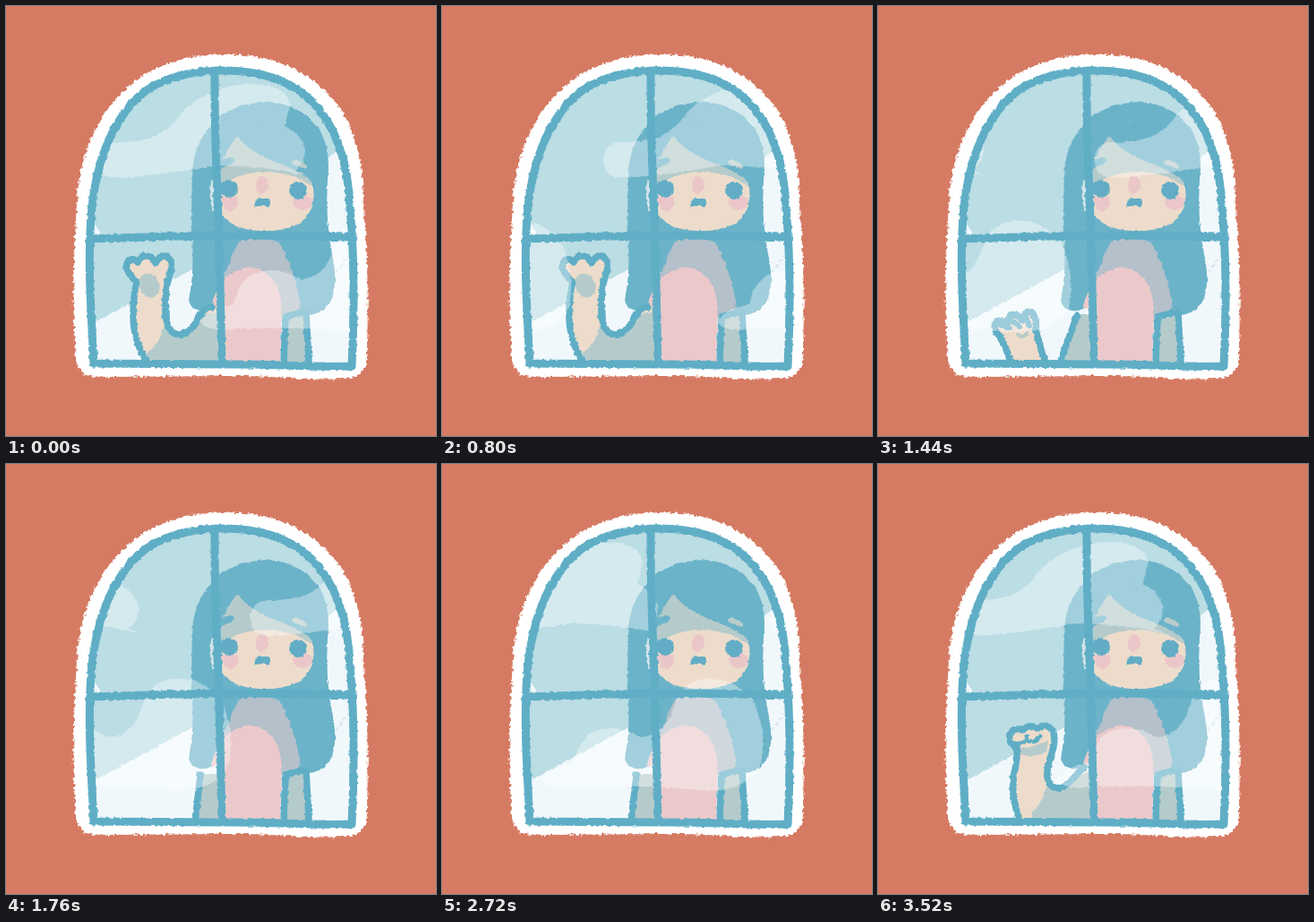
An HTML page for the animation above (3680 ms loop, 480x480 px).

```html
<!DOCTYPE html>
<html lang="en">
<head>
<meta charset="utf-8">
<title>Girl at the window</title>
<style>
  html, body { margin: 0; width: 100%; height: 100%; overflow: hidden; background: #d67b63; }
  svg { display: block; width: 100vw; height: 100vh; }
  .line { fill: none; stroke: #5faec6; stroke-width: 7.5; stroke-linecap: round; stroke-linejoin: round; }
  .bar { stroke-width: 9; }
  .hair { fill: #6bb3c9; }
  .ink { fill: #62adc5; }
  .skin { fill: #eddccb; }
  .shade { fill: #b5cbcb; }
  .rose { fill: #ebc6c8; }
  .cloud { fill: #fff; opacity: .38; }

  /* 23 drawings, 160 ms each */
  .cloud, .arm { animation: 3.68s -1ms infinite; }
  .cloud { animation-timing-function: steps(23); }
  .arm { animation-timing-function: step-end; }
  .high { animation-name: high; }
  .low { animation-name: low; }
  .up { animation-name: up; }
  .down { animation-name: down; }
  .curl { animation-name: curl; }
  .rest { animation-name: rest; }

  @keyframes high { to { transform: translateX(356px); } }
  @keyframes low { to { transform: translateX(410px); } }
  @keyframes up {
    0% { visibility: visible; transform: none; }
    34.7826% { visibility: visible; transform: translate(-4px, 34px); }
    39.1304%, 100% { visibility: hidden; transform: none; }
  }
  @keyframes down {
    0% { visibility: hidden; transform: none; }
    39.1304% { visibility: visible; transform: none; }
    43.4783% { visibility: visible; transform: translateY(28px); }
    47.8261% { visibility: hidden; transform: none; }
    86.9565% { visibility: visible; transform: translateY(18px); }
    91.3043%, 100% { visibility: hidden; transform: none; }
  }
  @keyframes curl {
    0% { visibility: hidden; transform: none; }
    91.3043% { visibility: visible; transform: translateY(26px); }
    95.6522%, 100% { visibility: visible; transform: none; }
  }
  @keyframes rest {
    0% { visibility: hidden; }
    47.8261% { visibility: visible; }
    86.9565%, 100% { visibility: hidden; }
  }
</style>
</head>
<body>
<svg viewBox="0 0 480 480">
  <defs>
    <filter id="brush" filterUnits="userSpaceOnUse" x="0" y="0" width="480" height="480" color-interpolation-filters="sRGB">
      <feTurbulence type="fractalNoise" baseFrequency=".2" numOctaves="2" seed="4" result="n"/>
      <feDisplacementMap in="SourceGraphic" in2="n" scale="3.5" xChannelSelector="R" yChannelSelector="G"/>
    </filter>
    <filter id="fluff" filterUnits="userSpaceOnUse" x="0" y="0" width="480" height="480" color-interpolation-filters="sRGB">
      <feTurbulence type="fractalNoise" baseFrequency=".28" numOctaves="2" seed="9" result="n"/>
      <feDisplacementMap in="SourceGraphic" in2="n" scale="6" xChannelSelector="R" yChannelSelector="G"/>
    </filter>
    <path id="pane" d="M98 399C95 340 91 290 95 235C99 180 116 132 148 101C172 80 204 73 238 72C280 71 317 82 341 106C370 135 382 176 384 225C389 280 389 340 386 402C340 404 300 399 240 400Z"/>
    <clipPath id="glass"><use href="#pane"/></clipPath>
    <path id="wisp" d="M103 168Q105 153 122 152Q146 152 163 147Q184 138 197 118Q210 104 230 96Q262 83 294 89Q314 94 317 110L311 134Q330 143 334 160Q334 174 323 184Q330 186 337 189Q285 178 235 178Q190 186 150 190Q118 194 108 188Q101 178 103 168Z"/>
    <path id="puff" d="M320 335Q327 295 310 262Q285 234 250 241Q230 247 222 272Q214 302 186 305Q154 286 128 302Q114 314 111 333Q84 338 74 352Q84 366 115 360Q200 358 250 364Q305 368 320 335Z"/>
  </defs>

  <rect width="480" height="480" fill="#d67b63"/>
  <path filter="url(#fluff)" fill="#fff" d="M78 393C73 330 76 275 79 220C82 165 104 114 144 84C174 62 208 54 244 54C293 53 335 70 363 102C391 132 400 180 399 225C405 285 404 340 403 390C403 408 394 415 378 416C330 418 300 412 240 413L103 414Q79 414 78 393Z"/>

  <g filter="url(#brush)">
    <g clip-path="url(#glass)">
      <rect x="80" y="60" width="320" height="350" fill="#bbdde4"/>
      <path fill="#f1f8fc" d="M90 358L210 293L330 205Q352 172 368 164L400 160V410H90ZM92 233L106 254H92Z"/>
      <path d="M369 297L382 279" stroke="#cfe3ea" stroke-width="2" stroke-dasharray="4 3"/>

      <path class="hair" d="M204 328Q210 300 208 260Q206 215 209 175Q216 140 242 121Q266 107 295 107Q334 112 351 140Q363 163 359 194Q356 240 365 282Q373 325 354 340Q338 348 322 344L240 330Q228 342 216 340Q205 337 204 328Z"/>
      <path d="M231 194Q227 212 232 228" fill="none" stroke="#d3e4e8" stroke-width="3"/>

      <path fill="#b4c0ca" d="M236 318L259 264Q284 255 305 264Q324 298 329 338L310 346L245 340Z"/>
      <path fill="#ebc9cb" d="M228 337L237 312Q254 291 276 292Q306 298 308 340L306 400H243V338Z"/>
      <path class="shade" d="M314 346H335L337 400H312Z"/>
      <path class="line" d="M312 347L310 398M314 346L335 342L338 398"/>

      <path class="shade" d="M258 145Q272 163 300 174Q326 183 343 197V215H238V182Q246 160 258 145Z"/>
      <path class="skin" d="M237 203Q260 185 290 185Q322 186 343 202Q346 232 325 244Q307 252 285 251Q253 250 240 232Z"/>
      <path class="rose" d="M240 213H258Q262 226 250 229Q241 227 240 213Z"/>
      <ellipse class="rose" cx="331" cy="219" rx="11" ry="9"/>
      <ellipse class="rose" cx="286" cy="200" rx="7" ry="10"/>
      <circle class="ink" cx="249" cy="204" r="10"/>
      <circle class="ink" cx="326" cy="206" r="10"/>
      <path class="ink" d="M277 220Q277 214 286 215Q295 214 295 220Q295 225 290 223L285 222L280 224Q277 224 277 220Z"/>
      <path d="M241 177L251 172" stroke="#6bb3c9" stroke-width="7" stroke-linecap="round"/>
      <path d="M322 174L333 179" stroke="#b9cccc" stroke-width="6" stroke-linecap="round"/>
      <path d="M282 134H288" stroke="#62adc5" stroke-width="2"/>

      <g class="arm rest">
        <path class="shade" d="M218 346H240V400H212Z"/>
        <path class="line" d="M217 347L211 400"/>
      </g>

      <g class="arm up">
        <path class="skin" d="M158 450V398Q142 374 142 346Q142 322 146 308Q133 297 135 287Q140 279 147 286Q150 278 158 279Q165 280 167 287Q171 278 179 279Q188 286 182 302Q177 320 178 346Q181 367 195 367Q209 363 216 346Q222 337 242 335V450Z"/>
        <path class="shade" d="M157 387Q171 380 177 354Q183 369 196 368Q210 364 218 346L242 338V450H158Z"/>
        <ellipse class="shade" cx="160" cy="312" rx="11" ry="14" transform="rotate(-28 160 312)"/>
        <path class="line" d="M158 450V398Q142 374 142 346Q142 322 146 308Q133 297 135 287Q140 279 147 286Q150 278 158 279Q165 280 167 287Q171 278 179 279Q188 286 182 302Q177 320 178 346Q181 367 195 367Q209 363 216 346Q222 337 230 336"/>
      </g>

      <g class="arm curl">
        <path class="skin" d="M158 450V398Q149 372 151 350Q156 330 155 317Q145 312 147 302Q151 293 162 297Q170 290 178 295Q188 289 195 297Q199 307 194 323Q188 338 189 350Q193 366 208 360Q222 350 242 336V450Z"/>
        <path class="shade" d="M158 317Q174 316 190 309L188 322Q172 328 158 324ZM172 389Q186 376 189 355Q196 366 210 360L242 338V450H172Z"/>
        <path class="line" d="M158 450V398Q149 372 151 350Q156 330 155 317Q145 312 147 302Q151 293 162 297Q170 290 178 295Q188 289 195 297Q199 307 194 323Q188 338 189 350Q193 366 208 360Q220 350 230 338"/>
        <path class="line" style="stroke-width:5" d="M152 312Q163 314 166 305M168 309Q178 312 181 303"/>
      </g>

      <g class="arm down">
        <path class="shade" d="M222 344H242V450H190L203 398Z"/>
        <path class="line" d="M222 346L203 398L190 450"/>
        <path class="skin" d="M148 450V398Q143 378 131 362Q128 352 137 351L145 354Q146 343 154 344L160 350Q164 339 172 342Q178 350 176 361Q180 378 187 398V450Z"/>
        <path class="shade" d="M155 363Q161 369 168 363L167 368Q160 373 155 368Z"/>
        <path class="line" d="M148 450V398Q143 378 131 362Q128 352 137 351L145 354Q146 343 154 344L160 350Q164 339 172 342Q178 350 176 361Q180 378 187 398V450"/>
        <path class="line" style="stroke-width:6" d="M136 355L147 360M148 350L158 358M165 347L169 357"/>
      </g>

      <g class="cloud high">
        <use href="#wisp"/>
        <use href="#wisp" x="-356"/>
      </g>
      <g class="cloud low">
        <use href="#puff" x="-267"/>
        <use href="#puff" x="143"/>
      </g>
    </g>

    <use href="#pane" class="line bar"/>
    <path class="line bar" d="M233 76Q233 150 236 205Q239 300 241 398M95 260Q170 257 240 256Q320 256 386 258"/>
  </g>
</svg>
</body>
</html>
```
